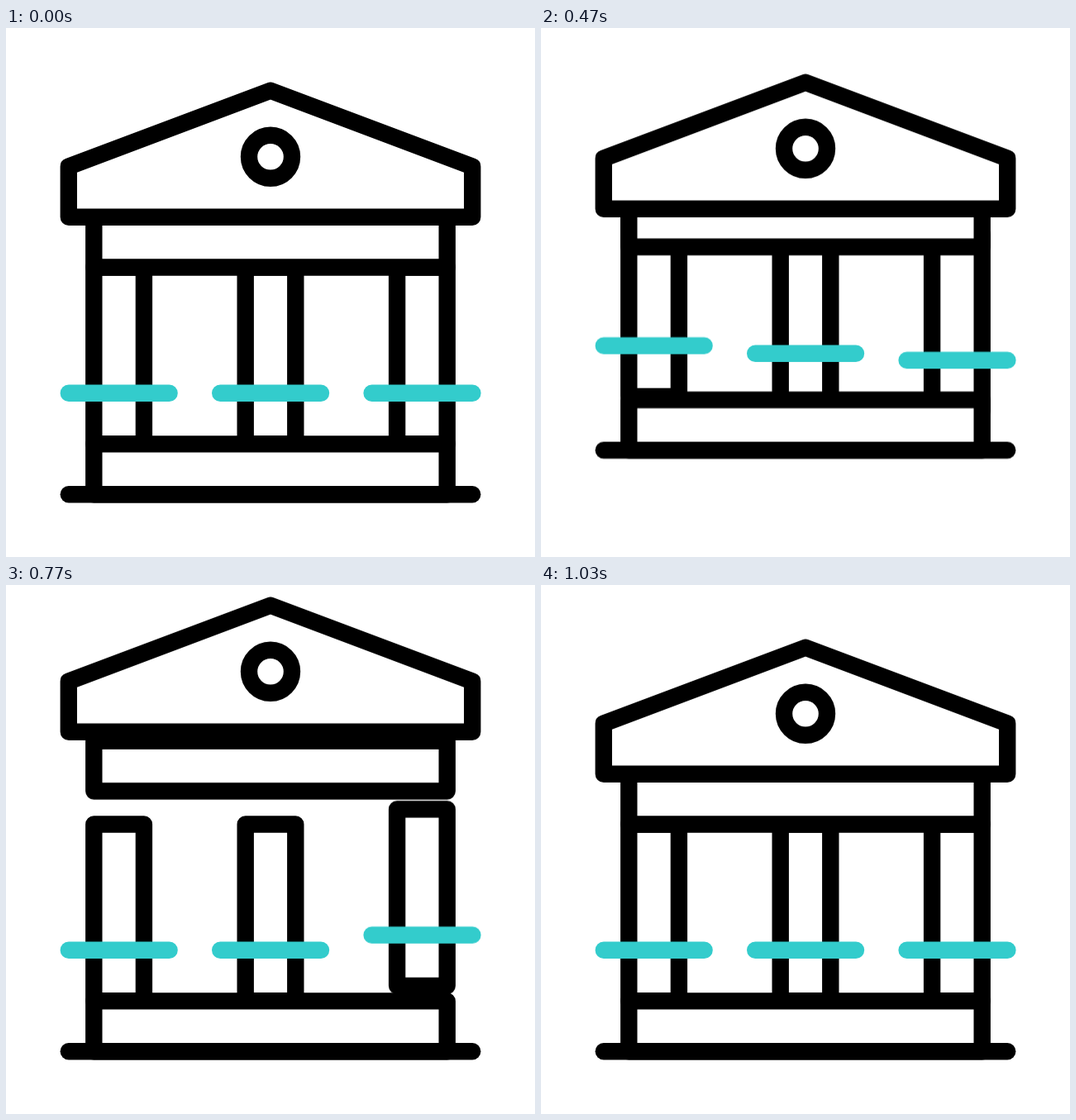
Recreate the animation shown at these times as an HTML page. Size 640x640 px, loop 1.67 s.

```html
<!DOCTYPE html>
<html lang="en">
<head>
<meta charset="utf-8">
<title>Bank icon</title>
<style>
  html, body { margin: 0; width: 100%; height: 100%; overflow: hidden; background: #fff; }
  svg { display: block; width: 100%; height: 100%; }

  .ink { fill: #fff; stroke: #000; }
  .band { stroke: #3cc; }
  .ink, .band { stroke-width: 20.4; stroke-linecap: round; stroke-linejoin: round; }

  .part {
    --rise: translateY(-58.3px);
    animation: 1670ms infinite cubic-bezier(.38, 0, .72, .95);
  }
  #base   { animation-name: base; }
  #left   { animation-name: left; }
  #middle { animation-name: middle; }
  #right  { animation-name: right; }
  #frieze { animation-name: frieze; }
  #roof   { animation-name: roof; }

  /* each part rests, rises, then drops back with a firmer curve */
  @keyframes base {
    0%, 11.4% { transform: none; }
    25.8% { transform: var(--rise); animation-timing-function: cubic-bezier(.333, .083, .667, .917); }
    40.1%, 100% { transform: none; }
  }
  @keyframes left {
    0%, 11.4% { transform: none; }
    27.2% { transform: var(--rise); animation-timing-function: cubic-bezier(.333, .083, .667, .917); }
    43.6%, 100% { transform: none; }
  }
  @keyframes middle {
    0%, 10.8% { transform: none; }
    32.8% { transform: var(--rise); animation-timing-function: cubic-bezier(.333, .083, .667, .917); }
    45.8%, 100% { transform: none; }
  }
  @keyframes right {
    0%, 10.8% { transform: none; }
    36.2% { transform: var(--rise); animation-timing-function: cubic-bezier(.333, .083, .667, .917); }
    51.4%, 100% { transform: none; }
  }
  @keyframes frieze {
    0%, 18% { transform: none; }
    38% { transform: var(--rise); animation-timing-function: cubic-bezier(.333, .083, .667, .917); }
    60%, 100% { transform: none; }
  }
  @keyframes roof {
    0%, 22% { transform: none; }
    42% { transform: var(--rise); animation-timing-function: cubic-bezier(.333, .083, .667, .917); }
    62%, 100% { transform: none; }
  }
</style>
</head>
<body>
<svg viewBox="0 0 640 640">
  <defs>
    <g id="column">
      <rect class="ink" x="106.3" y="289.5" width="60.6" height="213.8"/>
      <path class="band" d="M75.8 441.7H197.6"/>
    </g>
  </defs>
  <g id="left" class="part"><use href="#column"/></g>
  <g id="middle" class="part"><use href="#column" x="183.4"/></g>
  <g id="right" class="part"><use href="#column" x="366.8"/></g>
  <g id="base" class="part">
    <rect class="ink" x="106.3" y="503.4" width="427.4" height="60.9"/>
    <path class="ink" d="M75.8 564.3H564.2"/>
  </g>
  <g id="frieze" class="part">
    <rect class="ink" x="106.3" y="228.7" width="427.4" height="60.8"/>
  </g>
  <g id="roof" class="part">
    <path class="ink" d="M75.8 228.7V167.6L320 75.8L564.2 167.6V228.7Z"/>
    <circle class="ink" cx="320" cy="155.8" r="26"/>
  </g>
</svg>
<script>
  // Hold each pose for one tick, at 30 ticks per second.
  const loop = 1670, tick = 100 / 3;
  const motions = document.getAnimations();
  motions.forEach(m => m.pause());

  const start = performance.now();
  function draw() {
    const t = (performance.now() - start) % loop;
    const pose = Math.floor((t + 3.4) / tick) * tick;
    motions.forEach(m => { m.currentTime = pose; });
    requestAnimationFrame(draw);
  }
  draw();
</script>
</body>
</html>
```
